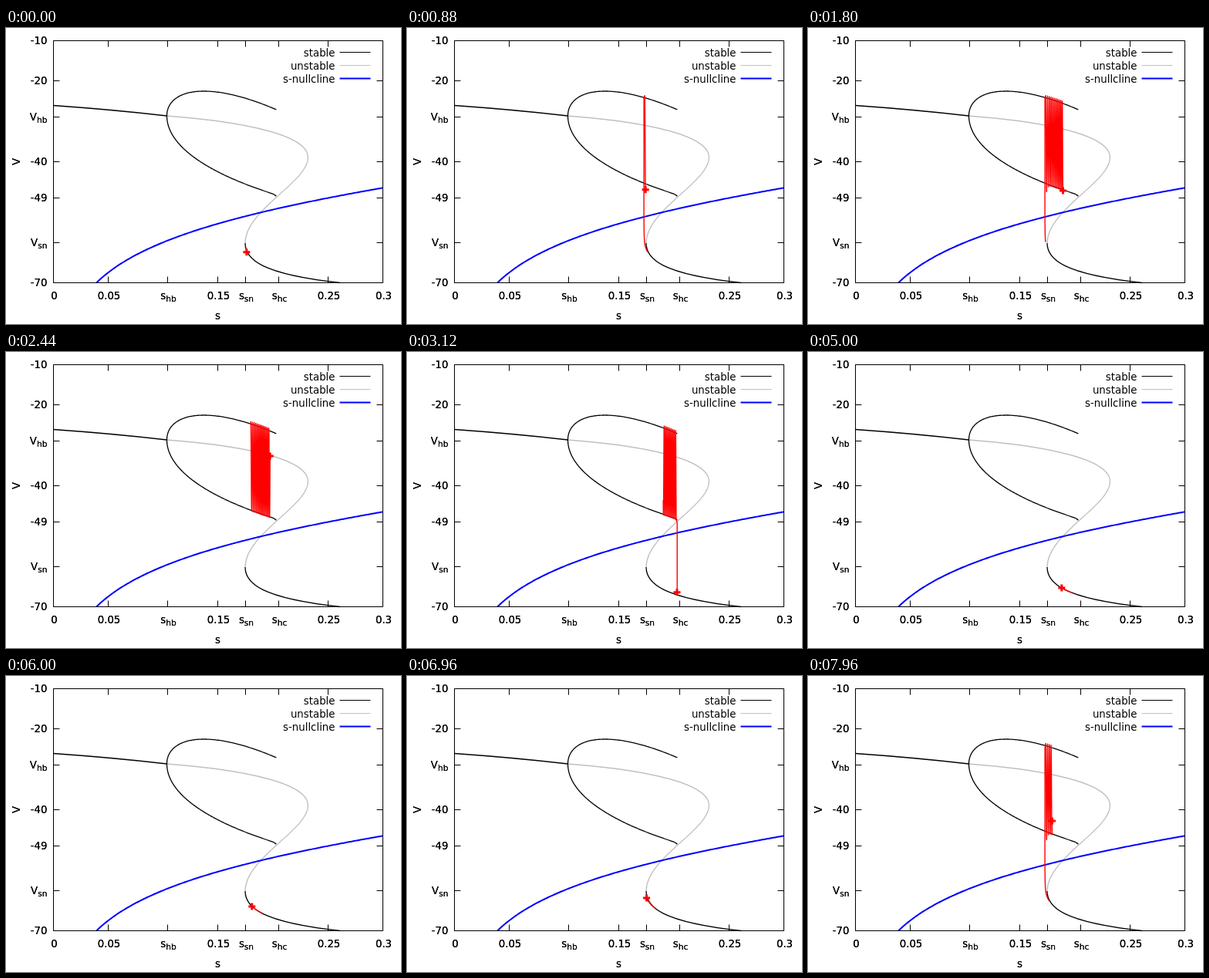
Write an HTML page with a canvas that moves like this. It is 512x384 px and loops after 8 s.

```html
<!DOCTYPE html>
<html lang="en">
<head>
<meta charset="utf-8">
<title>Bursting orbit</title>
<style>
  html, body { margin: 0; width: 100%; height: 100%; overflow: hidden; background: #fff; }
  canvas { display: block; }
</style>
</head>
<body>
<canvas id="stage" width="512" height="384"></canvas>
<script>
const ctx = document.getElementById('stage').getContext('2d');
const LOOP = 8000, STEP = 40, TRAIL = 1240;
const LEFT = 61.5, RIGHT = 488.5, TOP = 16.5, BOTTOM = 330.5;
const HOPF_X = 208.5, HOPF_Y = 114, CYCLE_END = 351.5;

// One burst cycle in ms, counted from the first spike's peak.
const PERIOD = 6789, FIRST_PEAK = 839, SPIKES_END = 2061, DRIFT_BACK = 2261, TURN = 6680;
const MIN_X = 307.1, MAX_X = 350.2;

const plotX = s => LEFT + s / 0.3 * (RIGHT - LEFT);
const plotY = v => TOP + (-10 - v) / 60 * (BOTTOM - TOP);

// Extremes of the limit cycle, which grows like a square root from the Hopf point.
function cycleTop(x) {
  const z = Math.sqrt(x - HOPF_X);
  return HOPF_Y - 8.04 * z + 0.32 * z ** 2 + 0.025 * z ** 3;
}

function cycleBottom(x) {
  const z = Math.sqrt(x - HOPF_X);
  return HOPF_Y + 9.2 * z - 0.0042 * z ** 3 + 3 * Math.exp((x - CYCLE_END) / 2);
}

function orbitX(phase) {
  if (phase < DRIFT_BACK) return Math.min(MAX_X, 308.1 + 0.0263 * phase - 3.1e-6 * phase ** 2);
  const left = Math.max(0, (TURN - phase) / (TURN - DRIFT_BACK));
  return MIN_X + (MAX_X - MIN_X) * left ** 1.22;
}

// Spikes swing between the extremes and slow down late in the burst; the first one undershoots.
function spikeY(phase, x) {
  const count = phase / 91.5 - 1.67e-6 * Math.max(0, phase - 961) ** 2;
  const rise = Math.cos(Math.PI * count) ** 2;
  const low = cycleBottom(x) + 1 + 20 * Math.exp(-phase / 60);
  return low + (cycleTop(x) - 3 - low) * rise;
}

// Fall to the lower branch, creep along it, then jump up to the next burst.
function restY(phase, x) {
  const branch = 257.2 + 22.6 * (x - MIN_X) ** 0.25;
  const fall = 1 / (1 + Math.exp((2207 - phase) / 22));
  const jump = 170 * Math.exp((phase - PERIOD) / 55);
  return 218.5 + (branch - 218.5) * fall - jump;
}

function orbit(time) {
  const phase = (time - FIRST_PEAK + PERIOD) % PERIOD, x = orbitX(phase);
  return [x, phase < SPIKES_END ? spikeY(phase, x) : restY(phase, x)];
}

function stroke(path, color, width) {
  ctx.strokeStyle = color;
  ctx.lineWidth = width;
  ctx.stroke(new Path2D(path));
}

function strokePoints(from, to, step, point, color, width) {
  ctx.beginPath();
  for (let u = from; u <= to; u += step) ctx.lineTo(...point(u));
  ctx.strokeStyle = color;
  ctx.lineWidth = width;
  ctx.lineJoin = 'round';
  ctx.stroke();
}

function setFont(size) {
  ctx.font = size + 'px "DejaVu Sans", sans-serif';
}

function label(text, x, y, align = 'center', size = 13.33) {
  setFont(size);
  ctx.textAlign = align;
  ctx.fillText(text, x, y);
  return ctx.measureText(text).width;
}

// Axis text is painted twice, which darkens its edges.
function axisLabel(...args) {
  label(...args);
  return label(...args);
}

// Text such as "s_hb" gets a subscript; x is its left, middle or right by `anchor` 0, 0.5 or 1.
function tickLabel(text, x, y, anchor) {
  const [base, sub = ''] = text.split('_');
  setFont(10.67);
  const subWidth = ctx.measureText(sub).width;
  setFont(13.33);
  const start = x - anchor * (ctx.measureText(base).width + subWidth);
  const width = axisLabel(base, start, y, 'left');
  if (sub) axisLabel(sub, start + width, y + 3, 'left', 10.67);
}

function drawAxes() {
  ctx.fillStyle = '#000';
  const xTicks = { s_hb: 209.5, s_sn: 310.5, s_hc: 353.5 };
  const yTicks = { V_hb: 115.5, V_sn: 278.5 };
  for (const s of ['0', '0.05', '0.15', '0.25', '0.3']) xTicks[s] = plotX(+s);
  for (const v of ['-10', '-20', '-40', '-49', '-70']) yTicks[v] = plotY(+v);

  for (const [text, pos] of Object.entries(xTicks)) {
    const x = Math.ceil(pos) - 0.5;
    stroke(`M${x} ${BOTTOM}v-8M${x} ${TOP}v8`, '#000', 1);
    tickLabel(text, x + 1, 352, 0.5);
  }
  for (const [text, pos] of Object.entries(yTicks)) {
    const y = Math.ceil(pos) - 0.5;
    stroke(`M${LEFT} ${y}h8M${RIGHT} ${y}h-8`, '#000', 1);
    tickLabel(text, 53.5, y + 4.5, 1);
  }
  axisLabel('s', 274.5, 378);
  ctx.save();
  ctx.translate(18, 173.5);
  ctx.rotate(-Math.PI / 2);
  axisLabel('V', 0, 0);
  ctx.restore();
}

function drawLegend() {
  const rows = [['stable', '#000', 1.2], ['unstable', '#c0c0c0', 1.2], ['s-nullcline', '#00f', 2]];
  rows.forEach(([text, color, width], i) => {
    label(text, 426.5, 36.5 + 17 * i, 'right');
    stroke(`M432.5 ${31.5 + 17 * i}h40`, color, width);
  });
}

function drawCurves() {
  stroke('M61.5 100.5Q140 106 208.5 114', '#000', 1.3);
  stroke('M310 279C310 300 330 319 433 330.5', '#000', 1.3);
  stroke('M208.5 114C275 119 391.5 133 391.5 168C391.5 200 310 236 310 279', '#c0c0c0', 1.3);

  const reach = Math.sqrt(CYCLE_END - HOPF_X);
  for (const edge of [cycleTop, cycleBottom]) {
    const point = z => [HOPF_X + z * z, edge(HOPF_X + z * z)];
    strokePoints(0, reach, reach / 120.5, point, '#000', 1.3);
  }
  const nullcline = s => [plotX(s), plotY(-38 + 10 * Math.log(s / (1 - s)))];
  strokePoints(0.0392, 0.3001, 0.00163, nullcline, '#00f', 2);
}

function drawOrbit(time) {
  strokePoints(Math.max(0, time - TRAIL), time, 2, orbit, '#f00', 1.4);
  const [x, y] = orbit(time);
  stroke(`M${x - 4.5} ${y}h9M${x} ${y - 4.5}v9`, '#f00', 3);
}

function draw(time) {
  ctx.fillStyle = '#fff';
  ctx.fillRect(0, 0, 512, 384);
  drawAxes();
  drawLegend();
  drawCurves();
  drawOrbit(time);
  stroke(`M${LEFT} ${TOP}H${RIGHT}V${BOTTOM}H${LEFT}Z`, '#000', 1);
}

const start = performance.now();
function tick() {
  const elapsed = (performance.now() - start) % LOOP;
  draw(Math.floor(elapsed / STEP) * STEP);
  requestAnimationFrame(tick);
}
tick();
</script>
</body>
</html>
```
